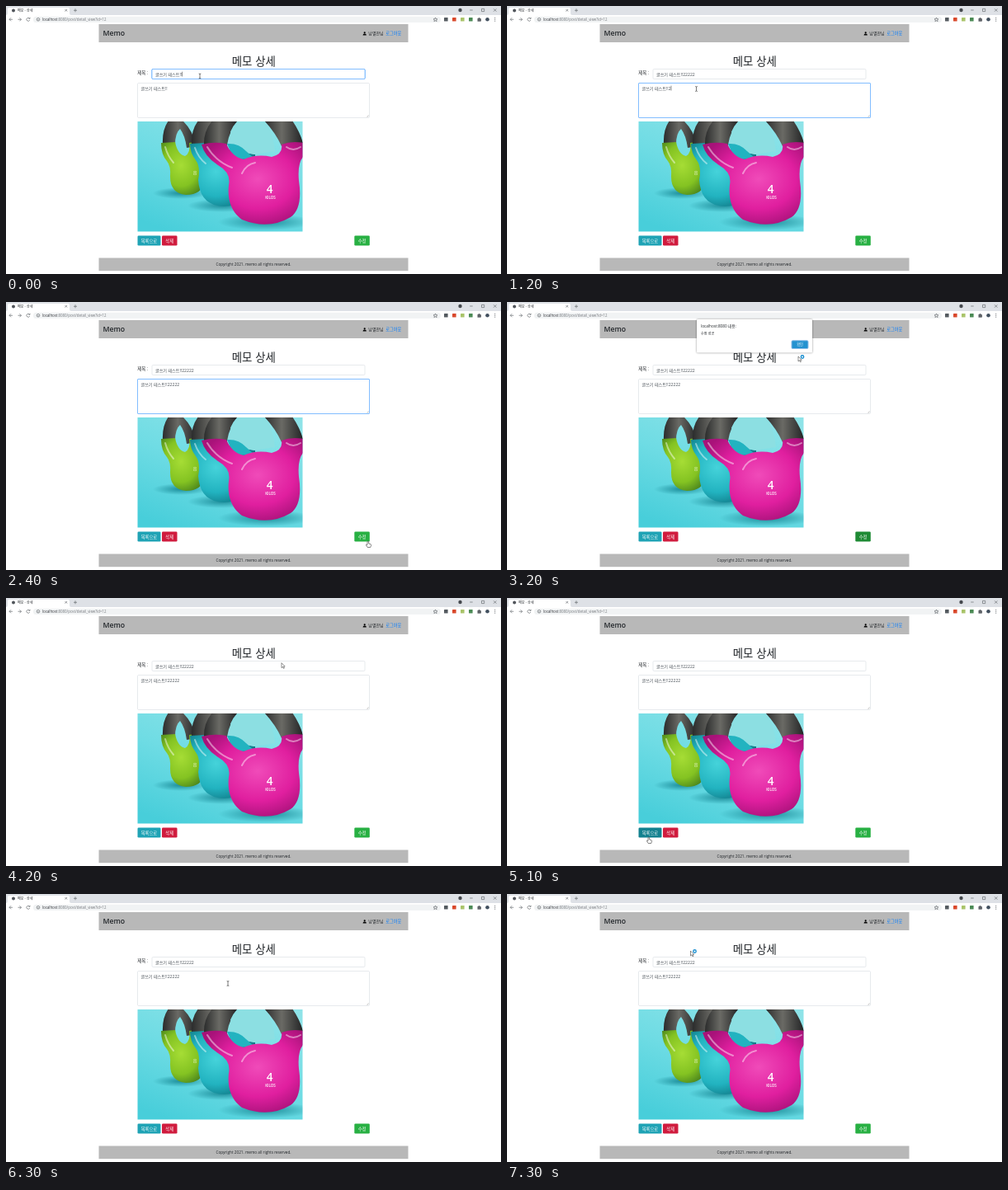
Recreate the animation shown at these times as an HTML page. Size 600 by 325 pixels, loop 7400 ms.

```html
<!DOCTYPE html>
<html lang="ko">
<head>
<meta charset="utf-8">
<title>메모 - 상세</title>
<style>
  html, body { margin: 0; width: 100%; height: 100%; overflow: hidden; background: #fff; }
  svg { display: block; width: 100vw; height: 100vh; }
  text { font-family: "Open Sans", "Noto Sans CJK KR", "Noto Sans CJK", sans-serif; font-size: 5.1px; fill: #212529; }
  .ko { font-family: "Noto Sans CJK KR", "Noto Sans CJK", sans-serif; }
  .mid { text-anchor: middle; }
  .label { fill: #fff; font-size: 5.3px; text-anchor: middle; }
  .value { fill: #495057; }
  .field { fill: #fff; stroke: #ced4da; stroke-width: .5; }
  .field.focus { stroke: #80bdff; stroke-width: .8; filter: drop-shadow(0 0 .7px #007bff); }
  .icon { fill: none; stroke: #5f6368; stroke-width: .65; }
  .busy { fill: none; stroke: #1b8fd0; stroke-width: 1.4; }
  .shine { fill: none; stroke: #fff; stroke-width: 2; stroke-linecap: round; opacity: .45; }
</style>
</head>
<body>
<svg viewBox="0 0 600 325">
  <defs>
    <linearGradient id="wall" x1=".8" y1="0" x2=".2" y2="1">
      <stop offset="0" stop-color="#8ee3e8"/><stop offset=".5" stop-color="#6fdce4"/><stop offset="1" stop-color="#48ceda"/>
    </linearGradient>
    <radialGradient id="green" cx=".45" cy=".45" r=".65">
      <stop offset="0" stop-color="#a6dd35"/><stop offset=".6" stop-color="#84c322"/><stop offset="1" stop-color="#46801c"/>
    </radialGradient>
    <radialGradient id="teal" cx=".4" cy=".45" r=".65">
      <stop offset="0" stop-color="#45d3da"/><stop offset=".6" stop-color="#22b3c0"/><stop offset="1" stop-color="#0f7683"/>
    </radialGradient>
    <radialGradient id="pink" cx=".55" cy=".45" r=".6">
      <stop offset="0" stop-color="#f04bb9"/><stop offset=".6" stop-color="#e01f9f"/><stop offset="1" stop-color="#a81279"/>
    </radialGradient>
    <linearGradient id="grip">
      <stop offset="0" stop-color="#2b2c2c"/><stop offset=".45" stop-color="#6a6a65"/><stop offset="1" stop-color="#232425"/>
    </linearGradient>
    <radialGradient id="shadow">
      <stop offset="0" stop-color="#087684" stop-opacity=".75"/><stop offset="1" stop-color="#087684" stop-opacity="0"/>
    </radialGradient>
    <clipPath id="frame"><rect x="159.500" y="140" width="200" height="133.500"/></clipPath>
  </defs>

  <!-- browser chrome -->
  <rect width="600" height="11" fill="#dee1e6"/>
  <path d="M0 11Q2 11 2 9V3.500Q2 2 4 2H75Q77 2 77 4V9Q77 11 79 11Z" fill="#fff"/>
  <circle id="favicon" cx="9" cy="5.500" r="2" fill="#50545a"/>
  <circle id="tabSpinner" class="icon" cx="9" cy="5.500" r="1.800" stroke-dasharray="7 4"/>
  <text class="ko" x="14" y="7" style="font-size:4px">메모 - 상세</text>
  <path class="icon" d="M71.500 4l2.600 2.600m0-2.600l-2.600 2.600M82 5.300h4m-2-2v4M562.200 5h3.500M576.500 3.400h3.200v3.200h-3.200zM591 3.300l3.400 3.400m0-3.400l-3.400 3.400"/>
  <circle cx="550.500" cy="5" r="2.200" fill="#45494e"/>
  <rect x="33" y="12.800" width="494" height="7.200" rx="3.600" fill="#f1f3f4"/>
  <path class="icon" d="M8 16.300H4m2-2l-2 2 2 2M14.500 16.300h4m-2-2l2 2-2 2M28.500 15a2 2 0 1 0 .3 2M29 13.800v1.600h-1.600"/>
  <circle class="icon" cx="39" cy="16.300" r="1.800"/>
  <path class="icon" d="M39 16v1.300"/>
  <text x="44" y="17.900" style="font-size:4.400px;fill:#74787d"><tspan fill="#303338">localhost</tspan>:8080/post/detail_view?id=12</text>
  <path class="icon" d="M520.500 14l.7 1.700 1.800.1-1.400 1.100.5 1.800-1.600-1-1.600 1 .5-1.800-1.400-1.100 1.800-.1z"/>
  <g id="extensions"></g>
  <path d="M571.500 15h1a1 1 0 0 1 2 0h1.200v1.300a1 1 0 0 1 0 1.600v.9h-4.200z" fill="#5f6368"/>
  <circle cx="583.500" cy="16.300" r="2.300" fill="#42505f"/>
  <path d="M592.700 14v.9m0 1v.9m0 1v.9" stroke="#5f6368" stroke-width="1"/>

  <!-- page -->
  <rect x="112.500" y="22" width="375" height="22" fill="#b8b8b8"/>
  <text x="117.500" y="36" style="font-size:8.700px;font-weight:600">Memo</text>
  <circle cx="434.700" cy="32.300" r="1.100"/>
  <path d="M432.500 35.600Q432.500 33.500 434.700 33.500T436.900 35.600Z"/>
  <text class="ko" x="439.300" y="35.100" style="font-size:5px">남별찬님</text>
  <text class="ko" x="460.300" y="35.100" style="font-size:5.200px;fill:#007bff">로그아웃</text>

  <g id="detail">
    <text class="ko mid" x="300.300" y="71.500" style="font-size:13.400px">메모 상세</text>
    <text class="ko" x="159.300" y="83.200" style="font-size:5.400px">제목 :</text>
    <rect id="titleBox" class="field" x="177" y="76.500" width="258" height="12" rx="1.300"/>
    <text id="titleText" class="value" x="181" y="84.500"></text>
    <rect id="bodyBox" class="field" x="159.500" y="93.500" width="281" height="42" rx="1.300"/>
    <text id="bodyText" class="value" x="163.500" y="101.500"></text>
    <path d="M437.500 134.500l2-2m-.8 2l.8-.8" stroke="#777" stroke-width=".4"/>
    <path id="caret" stroke="#222" stroke-width=".5"/>

    <g clip-path="url(#frame)">
      <rect x="159" y="140" width="201" height="134" fill="url(#wall)"/>
      <ellipse cx="212" cy="227" rx="34" ry="7" fill="url(#shadow)"/>
      <ellipse cx="262" cy="242" rx="42" ry="8" fill="url(#shadow)"/>
      <ellipse cx="315" cy="262" rx="58" ry="10" fill="url(#shadow)"/>

      <path d="M190 168Q189 150 197 139H214Q226 150 231 170L219 172Q217 157 211 149Q205 154 205 168Z" fill="url(#grip)"/>
      <path d="M188 166L205 165Q208 180 217 182Q224 178 222 166L236 164Q237 180 242 190V211Q238 229 218 229Q199 227 199 207Q200 194 195 188Q188 180 188 166Z" fill="url(#green)"/>
      <path class="shine" d="M193 171Q196 182 203 190"/>
      <text class="mid" x="229" y="205" style="font-size:8px;fill:#dcefb5">8</text>

      <path d="M225 169Q224 151 233 139H267L278 168H243Z" fill="url(#grip)"/>
      <path d="M223 167L242 166Q246 179 256 180L270 174L302 180V216Q292 243 264 243Q235 242 233 211Q236 195 230 187Q223 178 223 167Z" fill="url(#teal)"/>
      <path class="shine" d="M229 172Q233 184 242 191"/>

      <path d="M240 170Q239 152 250 139H281Q270 150 268 169Z" fill="url(#grip)"/>
      <path d="M281 140H314Q324 154 326 176L301 180L278 176L268 168Q271 150 281 140Z" fill="#8cdfe2"/>
      <path d="M268 167Q282 166 291 176L301 185H276Z" fill="#22b3c0"/>
      <path d="M313 139H347Q356 152 360 166L334 170Q327 154 313 139Z" fill="url(#grip)"/>
      <path d="M237 168Q252 164 267 167Q274 183 288 186Q304 179 322 183Q336 180 334 168Q346 163 361 166V182Q353 190 355 212Q360 245 345 256Q318 272 286 259Q267 245 270 217Q273 202 257 193Q241 183 237 168Z" fill="url(#pink)"/>
      <path class="shine" d="M244 171Q254 188 274 196M340 171Q348 177 357 171M286 203Q291 192 302 190"/>
      <text class="mid" x="319.500" y="227" style="font-size:13.500px;font-weight:600;fill:#fff">4</text>
      <text class="mid" x="320.500" y="234" style="font-size:4.500px;font-weight:600;fill:#fff">KILOS</text>
    </g>

    <rect id="listButton" x="159.500" y="278.500" width="28" height="12" rx="1.300"/>
    <text class="ko label" x="173.500" y="286.500">목록으로</text>
    <rect x="189" y="278.500" width="18.500" height="12" rx="1.300" fill="#d01c3e"/>
    <text class="ko label" x="198.200" y="286.500">삭제</text>
    <rect id="editButton" x="422.300" y="278.500" width="18.500" height="12" rx="1.300"/>
    <text class="ko label" x="431.500" y="286.500">수정</text>
    <rect x="112.500" y="305.500" width="375" height="15.700" fill="#b8b8b8"/>
    <text class="mid" x="300" y="315" style="font-size:4.700px">Copyright 2021. memo all rights reserved.</text>
  </g>

  <g id="alert">
    <rect x="230" y="21" width="140" height="40.500" rx="1.300" fill="#fff" style="filter:drop-shadow(0 .6px 1px #0007)"/>
    <text x="235" y="31.300" style="font-size:4.700px">localhost:8080 내용:</text>
    <text class="ko" x="235" y="40" style="font-size:4.100px">수정 성공</text>
    <rect x="345" y="46.800" width="20" height="9.700" rx="1.300" fill="#2492d0" stroke="#8dbbe8" stroke-width="1"/>
    <text class="ko label" x="355" y="53.300" style="font-size:4.200px">확인</text>
  </g>

  <g id="cursor">
    <path id="beam" d="M-1.300-3Q0-3 0-2V2Q0 3-1.300 3M1.300-3Q0-3 0-2M0 2Q0 3 1.300 3" fill="none" stroke="#222" stroke-width=".6"/>
    <path id="hand" d="M-1-2.500Q0-3.500.7-2.500V0L3 .7Q3.800 1 3.500 2.500L2.700 4.500H-.8L-2.700 1.500Q-2.500.5-1 1.500Z" fill="#fff" stroke="#222" stroke-width=".55"/>
    <g id="arrow">
      <path d="M-1.500-2V4L0 2.700 1 4.800 1.900 4.400 1 2.300H2.700Z" fill="#fff" stroke="#222" stroke-width=".5"/>
      <circle id="busy" class="busy" cx="3.500" cy="-1.500" r="1.700"/>
    </g>
  </g>
</svg>
<script>
const $ = id => document.getElementById(id);
const LOOP = 7400, STEP = 100, BASE = "글쓰기 테스트!!";

// time, x, y, shape from this time on
const pointer = [
  [0, 235, 85, "beam"], [800, 235, 85, "beam"], [1000, 229.5, 100.5, "beam"], [1700, 229.5, 100.5, "beam"],
  [1900, 380, 230, "arrow"], [2100, 460, 297, "arrow"], [2300, 439, 293, "hand"], [2500, 439, 293, "hand"],
  [2700, 432, 285, "arrow"], [3100, 354.5, 68, "arrow"], [3200, 354.5, 68, "arrow"], [3400, 355, 53, "arrow"],
  [4100, 355, 53, "arrow"], [4500, 230, 230, "arrow"], [4800, 172, 293, "hand"], [5300, 172, 293, "arrow"],
  [5900, 269, 108.5, "hand"], [6200, 269, 108.5, "beam"], [6600, 269, 108.5, "beam"],
  [7100, 224, 71, "arrow"], [7400, 224, 71, "arrow"]
];

$("extensions").innerHTML = ["#555b60", "#d9482b", "#a9c46a", "#4b8a55"]
  .map((color, i) => `<rect x="${531 + i * 10}" y="14" width="4.600" height="4.600" rx=".5" fill="${color}"/>`).join("");

const show = (id, visible) => $(id).style.display = visible ? "" : "none";
const within = (t, from, to) => t >= from && t < to;

function type(id, t, start) {
  const count = Math.max(0, Math.min(5, Math.floor((t - start) / STEP) + 1));
  $(id).textContent = BASE + "2".repeat(count);
}

function placePointer(t) {
  const next = pointer.findIndex(key => key[0] > t);
  const [t0, x0, y0, shape] = pointer[next - 1], [t1, x1, y1] = pointer[next];
  const p = (t - t0) / (t1 - t0), ease = p * p * (3 - 2 * p);
  $("cursor").setAttribute("transform", `translate(${x0 + (x1 - x0) * ease} ${y0 + (y1 - y0) * ease})`);
  for (const id of ["beam", "hand", "arrow"]) show(id, id === shape);
  show("busy", within(t, 3100, 3800) || t >= 7100);
}

function draw(t) {
  const inTitle = t < 900, inBody = within(t, 900, 2500);
  const loading = within(t, 3500, 3800) || within(t, 5900, 6100);
  type("titleText", t, 300);
  type("bodyText", t, 1200);
  $("titleBox").classList.toggle("focus", inTitle);
  $("bodyBox").classList.toggle("focus", inBody);

  show("detail", !within(t, 5400, 6000));
  show("alert", within(t, 2700, 3500));
  show("favicon", !loading);
  show("tabSpinner", loading);
  $("editButton").setAttribute("fill", within(t, 2500, 3600) ? "#1e8a34" : "#28b043");
  $("listButton").setAttribute("fill", within(t, 4800, 5400) ? "#13818f" : "#1fa3b5");

  show("caret", t < 1700);
  if (t < 1700) {
    const text = $(inTitle ? "titleText" : "bodyText");
    const x = +text.getAttribute("x") + text.getComputedTextLength() + .4;
    $("caret").setAttribute("d", `M${x} ${inTitle ? 79.7 : 96.7}v5.800`);
  }
  placePointer(t);
}

function tick(now) {
  draw(Math.floor(now % LOOP / STEP) * STEP);
  requestAnimationFrame(tick);
}
draw(0);
requestAnimationFrame(tick);
</script>
</body>
</html>
```
